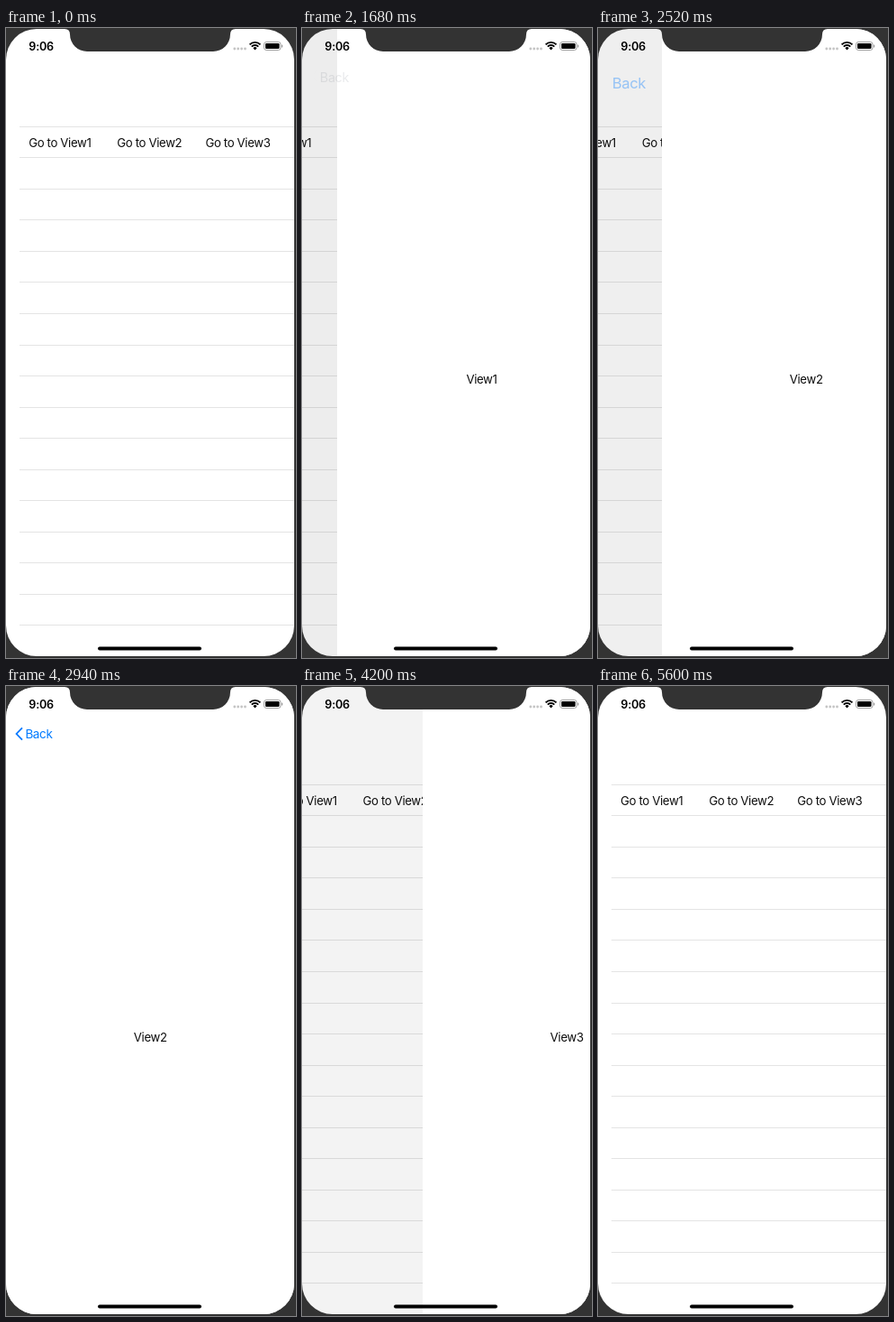
An HTML page with a canvas for the animation above (5.95 s loop, 322x698 px).

```html
<!DOCTYPE html>
<html lang="en">
<head>
<meta charset="utf-8">
<title>Navigation push and pop</title>
<style>
  html, body { margin: 0; width: 100%; height: 100%; overflow: hidden; background: #333; }
  canvas { display: block; width: 322px; height: 698px; }
</style>
</head>
<body>
<canvas id="stage" width="322" height="698"></canvas>
<script>
const ctx = document.getElementById('stage').getContext('2d');
const LOOP = 5950, STEP = 70, WIDTH = 320;
const SPRING = 0.0155; // critically damped rate per ms
const BLUE = '0,122,255', GREY = '110,115,125';

// tap: moment of the press, start: moment the spring lets go
const moves = [
  { tap: 770, start: 795, view: 1, push: true },
  { tap: 1610, start: 1641, view: 1, push: false },
  { tap: 2310, start: 2336, view: 2, push: true },
  { tap: 3080, start: 3101, view: 2, push: false },
  { tap: 4060, start: 4074, view: 3, push: true },
  { tap: 4970, start: 5021, view: 3, push: false },
];

function spring(ms) {
  const x = SPRING * Math.max(0, ms);
  return 1 - (1 + x) * Math.exp(-x);
}

function text(str, x, y, color, size = 13.2, weight = 400, align = 'left', spacing = -0.35) {
  ctx.font = `${weight} ${size}px Inter, sans-serif`;
  ctx.letterSpacing = spacing + 'px';
  ctx.textAlign = align;
  ctx.fillStyle = color;
  ctx.fillText(str, x, y);
}

function pill(x, y, w, h, r, color) {
  ctx.fillStyle = color;
  ctx.beginPath();
  ctx.roundRect(x, y, w, h, r);
  ctx.fill();
}

function drawList(cover, pressed) {
  ctx.save();
  ctx.translate(-0.3 * WIDTH * cover, 0);
  ctx.fillStyle = '#e4e4e4';
  for (let k = 0; k < 17; k++) ctx.fillRect(15, Math.round(108.92 + 34.513 * k), 400, 1);
  for (let n = 1; n <= 3; n++) {
    text('Go to View' + n, 25.2 + 98.1 * (n - 1), 131.8, `rgba(0,0,0,${n === pressed ? 0.3 : 0.95})`);
  }
  ctx.restore();
}

function drawView(cover, n) {
  ctx.fillStyle = `rgba(0,0,0,${0.08 * cover})`;
  ctx.fillRect(0, 0, WIDTH, 698);
  const left = WIDTH * (1 - cover);
  ctx.fillStyle = '#fff';
  ctx.fillRect(Math.round(left), 0, WIDTH, 698);
  text('View' + n, left + 160, 394.4, '#0c0c0c', 13.2, 400, 'center');
}

// The label shrinks from large-title place into the bar.
function drawBack(cover, push, pressed) {
  const away = 1 - cover, drift = push ? away : away / 2;
  const leaving = !push && !pressed;
  const strength = leaving ? 0.2 : pressed ? 0.3 : 1;
  const rgb = leaving ? GREY : BLUE;
  const fade = k => Math.max(0, 1 - k * away) * strength;
  text('Back', 21.4 - 25 * drift, 57.6 + 41 * drift, `rgba(${rgb},${fade(push ? 2.8 : 2)})`, 13.5 * (1 + drift));
  ctx.strokeStyle = `rgba(${rgb},${fade(push ? 5 : 8)})`;
  ctx.lineWidth = 1.8;
  ctx.beginPath();
  ctx.moveTo(18, 46.3);
  ctx.lineTo(11.6, 53);
  ctx.lineTo(18, 59.7);
  ctx.stroke();
}

function drawStatus() {
  text('9:06', 25.3, 24.5, '#000', 12.6, 600, 'left', -0.2);
  for (let i = 0; i < 4; i++) pill(252.4 + 3.9 * i, 21.6, 2.8, 2.8, 1.4, '#c4c4c4');

  ctx.strokeStyle = '#000';
  ctx.lineWidth = 1.9;
  for (const r of [8.4, 5.3]) {
    ctx.beginPath();
    ctx.arc(276.5, 24.3, r, -Math.PI * 0.75, -Math.PI * 0.25);
    ctx.stroke();
  }
  ctx.fillStyle = '#000';
  ctx.beginPath();
  ctx.moveTo(276.5, 24.5);
  ctx.arc(276.5, 24.3, 3, -Math.PI * 0.75, -Math.PI * 0.25);
  ctx.fill();

  ctx.strokeStyle = '#a0a0a0';
  ctx.lineWidth = 1;
  ctx.beginPath();
  ctx.roundRect(286.5, 15.5, 18.5, 9, 2.6);
  ctx.stroke();
  pill(288, 17, 15.5, 6, 1.3, '#000');
  pill(306, 18.4, 1.2, 3.2, 0.6, '#a0a0a0');
  pill(102, 685.6, 115, 4, 2, '#000');
}

function drawNotch() {
  ctx.fillStyle = '#333';
  ctx.fill(new Path2D('M65 0V1Q71 1 71 7A19 19 0 0 0 90 26H230A19 19 0 0 0 249 7Q249 1 255 1V0Z'));
}

function draw(now) {
  const t = Math.floor((now % LOOP) / STEP) * STEP;
  const move = moves.findLast(m => t >= m.tap);
  const pressed = !!move && t < move.tap + STEP;
  let cover = 0;
  if (move) {
    const done = t >= move.tap + 10 * STEP ? 1 : spring(t - move.start);
    cover = move.push ? done : 1 - done;
  }

  ctx.fillStyle = '#333';
  ctx.fillRect(0, 0, 322, 698);
  ctx.save();
  ctx.beginPath();
  ctx.roundRect(0, 1, WIDTH, 695, 34);
  ctx.clip();
  ctx.fillStyle = '#fff';
  ctx.fillRect(0, 0, WIDTH, 698);
  drawList(cover, pressed && move.push ? move.view : 0);
  if (cover > 0) {
    drawView(cover, move.view);
    drawBack(cover, move.push, pressed && !move.push);
  }
  drawStatus();
  ctx.restore();
  drawNotch();
}

const begin = performance.now();
function tick() {
  draw(performance.now() - begin);
  requestAnimationFrame(tick);
}
tick();
</script>
</body>
</html>
```
